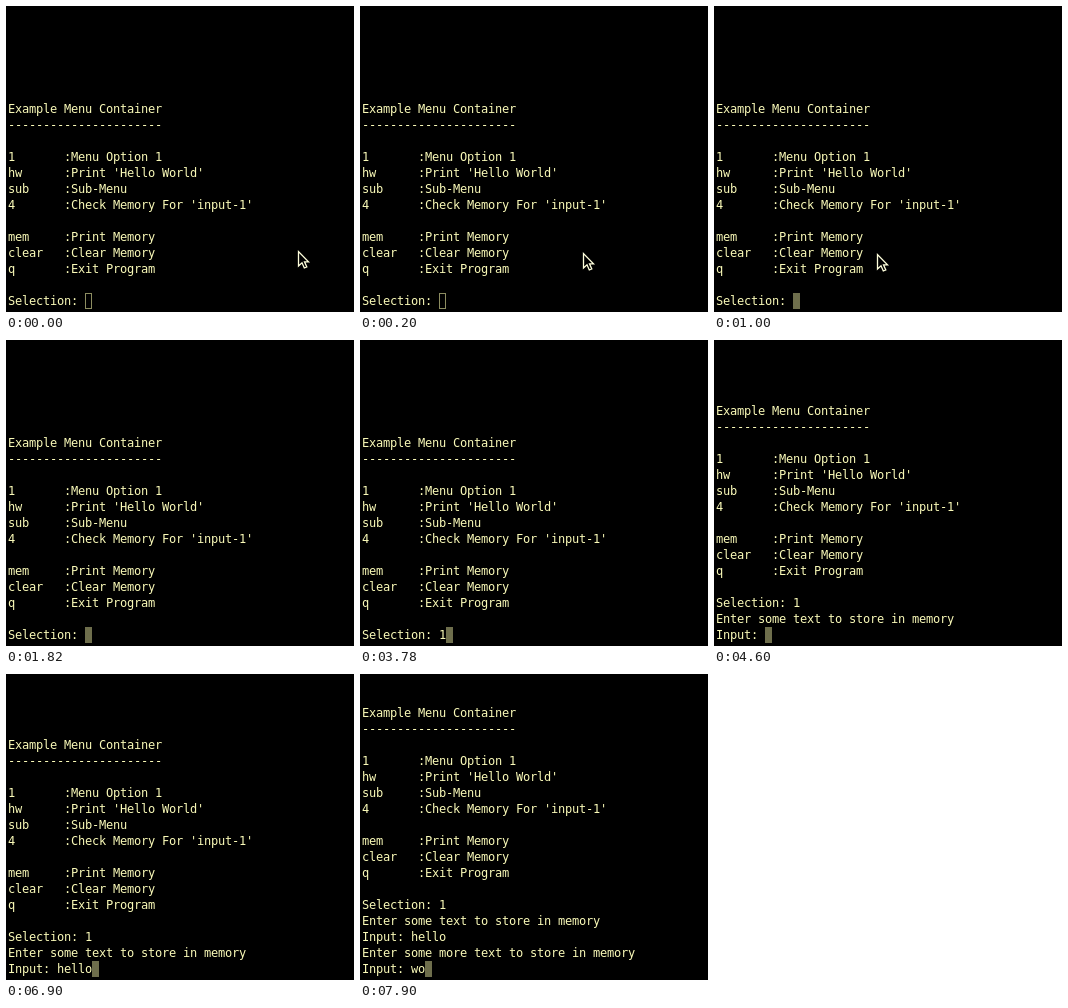
These frames come from a looping animation (348 px wide and 306 px high, 8 s). An HTML page:

```html
<!DOCTYPE html>
<html lang="en">
<head>
<meta charset="utf-8">
<title>Terminal menu</title>
<style>
  html, body { margin: 0; width: 100%; height: 100%; overflow: hidden; background: #000; }
  svg { display: block; width: 100%; height: 100%; }
  text {
    font: 12px "DejaVu Sans Mono", "Liberation Mono", monospace;
    letter-spacing: -0.2246px;
    white-space: pre;
    fill: #fafab8;
  }
</style>
</head>
<body>
<svg viewBox="0 0 348 306" xmlns="http://www.w3.org/2000/svg">
  <rect width="348" height="306" fill="#000"/>
  <g id="screen"></g>
  <rect id="caret"/>
  <path id="pointer" d="M.5 .5V15L4 11.8L6.3 17L8.8 16L6.5 10.8H10.5Z"
        fill="#000" stroke="#ffffdc" stroke-width="1.3"/>
</svg>
<script>
const LOOP = 8000, CELL = 7, ROW = 16, LEFT = 2, LAST_TOP = 287;

const menu = [
  'Example Menu Container',
  '-'.repeat(22),
  '',
  '1       :Menu Option 1',
  "hw      :Print 'Hello World'",
  'sub     :Sub-Menu',
  "4       :Check Memory For 'input-1'",
  '',
  'mem     :Print Memory',
  'clear   :Clear Memory',
  'q       :Exit Program',
  ''
];

// Each prompt appears at `at`; its keys are typed at the listed times.
const prompts = [
  { at: 0, lines: ['Selection: '], text: '1', keys: [3780] },
  { at: 4600, lines: ['Enter some text to store in memory', 'Input: '],
    text: 'hello', keys: [6180, 6380, 6480, 6600, 6740] },
  { at: 7120, lines: ['Enter some more text to store in memory', 'Input: '],
    text: 'wo', keys: [7800, 7900] }
];

const FOCUS = 1000, LEAVE = 1720, GONE = 1820;
const $ = id => document.getElementById(id);
const screen = $('screen'), caret = $('caret'), pointer = $('pointer');
const clamp = v => Math.min(1, Math.max(0, v));
const setAttrs = (el, attrs) => {
  for (const name in attrs) el.setAttribute(name, attrs[name]);
};

const rowCount = prompts.reduce((n, p) => n + p.lines.length, menu.length);
const rows = Array.from({ length: rowCount }, () => {
  const el = document.createElementNS('http://www.w3.org/2000/svg', 'text');
  el.setAttribute('x', LEFT);
  return screen.appendChild(el);
});

function linesAt(t) {
  const lines = [...menu];
  for (const p of prompts) {
    if (t < p.at) break;
    lines.push(...p.lines);
    lines[lines.length - 1] += p.text.slice(0, p.keys.filter(k => t >= k).length);
  }
  return lines;
}

function drawCaret(col, focused) {
  const x = LEFT + col * CELL;
  setAttrs(caret, focused
    ? { x, y: LAST_TOP, width: CELL, height: ROW, fill: '#6e6e4c', stroke: 'none' }
    : { x: x + .5, y: LAST_TOP + .5, width: CELL - 1, height: ROW - 1,
        fill: 'none', stroke: '#8c8c60' });
}

function drawPointer(t) {
  const glide = 1 - Math.pow(1 - clamp((t - 20) / 620), 2.2);
  const exit = clamp((t - LEAVE) / (GONE - LEAVE));
  const x = Math.round(292 - 129 * glide - 2 * exit);
  const y = Math.round(245 + 2.9 * glide + 60 * Math.pow(exit, 1.5));
  setAttrs(pointer, {
    transform: `translate(${x} ${y})`,
    visibility: t < GONE ? 'visible' : 'hidden'
  });
}

function render(t) {
  const lines = linesAt(t);
  const last = lines.length - 1;
  rows.forEach((el, i) => {
    const line = lines[i] || '';
    if (el.textContent !== line) el.textContent = line;
    el.setAttribute('y', LAST_TOP + 12 - (last - i) * ROW);
  });
  drawCaret(lines[last].length, t >= FOCUS);
  drawPointer(t);
}

const start = performance.now();
function tick() {
  render((performance.now() - start) % LOOP);
  requestAnimationFrame(tick);
}
tick();
</script>
</body>
</html>
```
